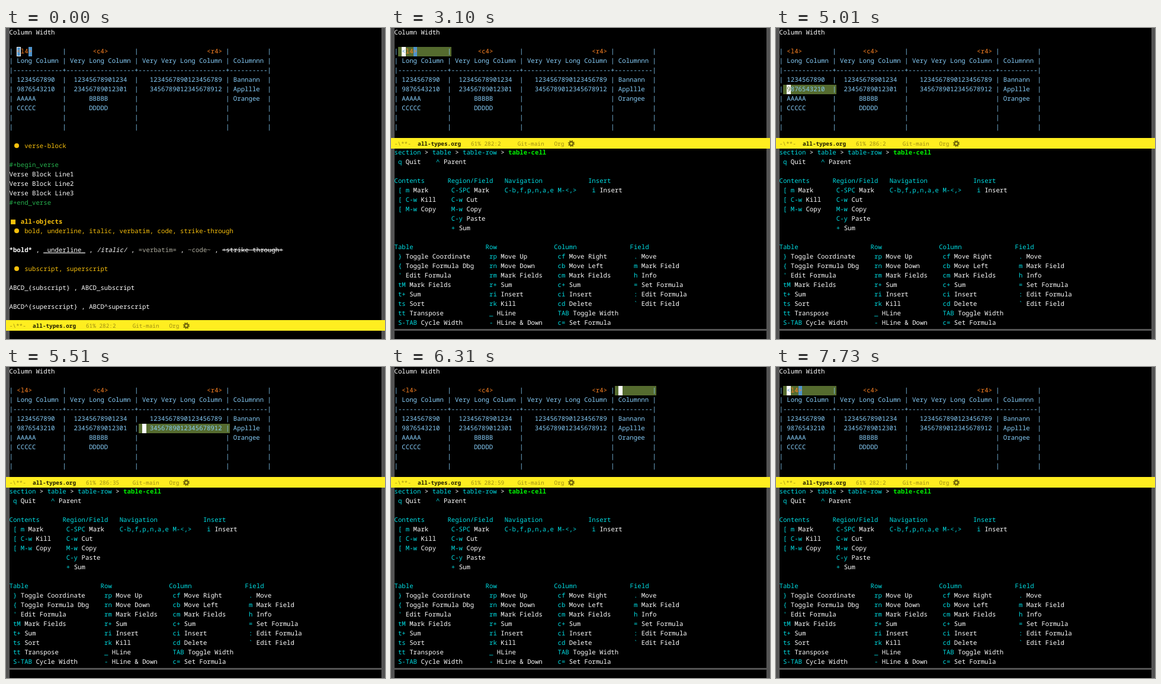
Write an HTML page that moves like this. It is 640x526 px and loops after 8000 ms.

```html
<!DOCTYPE html>
<html lang="en">
<head>
<meta charset="utf-8">
<title>Table editing</title>
<style>
  html, body { margin: 0; width: 100%; height: 100%; overflow: hidden; background: #000; }
  #stage { position: relative; width: 640px; height: 526px; overflow: hidden; background: #000;
    font: 10.7px/16px "Noto Sans Mono", "DejaVu Sans Mono", monospace; color: #fff;
    text-rendering: geometricPrecision; font-variant-ligatures: none; }
  #stage div, #stage span { position: absolute; white-space: pre; }
  .fringe { top: 0; width: 6px; height: 526px; background: #545454; }
  #panel { top: 203px; left: 0; width: 640px; height: 309px; }
  #rule { top: 306px; width: 640px; height: 3px; background: #545454; }
  #bar { left: 0; width: 640px; height: 18px; background: #ffee20; color: #9c8c14;
    font-size: 9.37px; line-height: 19px; }
  #bar .file { color: #1c1a00; font-weight: bold; }
  #bar svg { position: absolute; left: 298px; top: 3px; fill: none; stroke: #6e6208; }
  .table { color: #87cefa; }
  .tag { color: #ff8424; }
  .gold { color: #f8c00c; }
  .green { color: #26b24e; }
  .dim { color: #b0aea0; }
  .cyan { color: #00dce2; }
  .here { color: #00f400; }
  .bold { font-weight: bold; }
  .italic { font-style: italic; }
  .under { text-decoration: underline; }
  .strike { text-decoration: line-through; }
  .mark { width: 8px; height: 8px; background: #f8c00c; }
  .dot { border-radius: 50%; }
  #field { height: 16px; background: #556b2f; }
  .pair, #cursor { width: 6.42px; height: 16px; }
  .pair { background: #4f94cd; }
  #cursor { box-sizing: border-box; background: #fff; }
  #cursor.hollow { background: #4f94cd; border: 1px solid #fff; text-indent: -1px; line-height: 14px; }
</style>
</head>
<body>
<div id="stage">
  <div class="fringe" style="left:0"></div>
  <div class="fringe" style="left:634px"></div>
  <div id="field"></div>
  <div id="top"></div>
  <div id="cursor"></div>
  <div id="text"></div>
  <div id="panel"><div id="rule"></div></div>
  <div id="bar">
    <svg width="13" height="13" viewBox="-6.5 -6.5 13 13">
      <circle r="3.1" stroke-width="2.2"/>
      <circle r="4.8" stroke-width="1.6" stroke-dasharray="1.885"/>
    </svg>
  </div>
</div>
<script>
const LOOP = 8000, LEFT = 5.5, CHAR = 6.42, LINE = 16;
const $ = id => document.getElementById(id);
const head = $('top'), text = $('text'), panel = $('panel'), bar = $('bar'),
      field = $('field'), cursor = $('cursor');
const colX = col => LEFT + col * CHAR;

function add(parent, tag, x, y, cls, str = '') {
  const el = document.createElement(tag);
  el.className = cls;
  el.style.left = x + 'px';
  el.style.top = y + 'px';
  el.textContent = str;
  return parent.appendChild(el);
}
const put = (parent, col, row, str, cls = '') =>
  add(parent, 'span', colX(col), row * LINE, cls, str);

// Table
const table = [
  '|             |                  |                       |          |',
  '| Long Column | Very Long Column | Very Very Long Column | Columnnn |',
  '|-------------+------------------+-----------------------+----------|',
  '| 1234567890  |  12345678901234  |   1234567890123456789 | Bannann  |',
  '| 9876543210  |  23456789012301  |   3456789012345678912 | Appllle  |',
  '| AAAAA       |      BBBBB       |                       | Orangee  |',
  '| CCCCC       |      DDDDD       |                       |          |',
  '|             |                  |                       |          |',
  '|             |                  |                       |          |'
];
const bars = [0, 14, 33, 57, 68];
const pair = add(head, 'div', colX(5), 2 * LINE, 'pair');
put(head, 0, 0, 'Column Width');
table.forEach((line, i) => put(head, 0, i + 2, line, 'table'));
[[2, '<l4>'], [22, '<c4>'], [52, '<r4>']].forEach(([c, s]) => put(head, c, 2, s, 'tag'));

// Document below the table
function heading(row, str) {
  add(text, 'div', 14, row * LINE + 3, 'mark dot');
  put(text, 4, row, str, 'gold');
}
heading(12, 'verse-block');
put(text, 0, 14, '#+begin_verse', 'green');
[1, 2, 3].forEach(n => put(text, 0, 14 + n, 'Verse Block Line' + n));
put(text, 0, 18, '#+end_verse', 'green');
add(text, 'div', 8, 324, 'mark');
put(text, 3, 20, 'all-objects', 'gold bold');
heading(21, 'bold, underline, italic, verbatim, code, strike-through');
let col = 0;
[['*bold*', 'bold'], ['_underline_', 'under'], ['/italic/', 'italic'],
 ['=verbatim=', 'dim'], ['~code~', 'dim'], ['+strike through+', 'strike']].forEach(([s, cls], i) => {
  if (i) put(text, col - 2, 23, ',');
  put(text, col, 23, s, cls);
  col += s.length + 3;
});
heading(25, 'subscript, superscript');
put(text, 0, 27, 'ABCD_{subscript} , ABCD_subscript');
put(text, 0, 29, 'ABCD^{superscript} , ABCD^superscript');

// Key menu
function command(col, row, item) {
  const [key, label = ''] = item.split('|');
  put(panel, col, row, key, 'cyan');
  put(panel, col + key.length + 1, row, label);
}
function group(col, row, title, items) {
  put(panel, col, row, title, 'cyan');
  items.forEach((item, i) => command(col + 1, row + 1 + i, item));
}
put(panel, 0, 0, 'section', 'cyan');
put(panel, 10, 0, 'table', 'cyan');
put(panel, 18, 0, 'table-row', 'cyan');
put(panel, 30, 0, 'table-cell', 'here bold');
[8, 16, 28].forEach(c => put(panel, c, 0, '>'));
command(1, 1, 'q|Quit');
command(11, 1, '^|Parent');
group(0, 3, 'Contents', ['[ m|Mark', '[ C-w|Kill', '[ M-w|Copy']);
group(14, 3, 'Region/Field', ['C-SPC|Mark', 'C-w|Cut', 'M-w|Copy', 'C-y|Paste', '+|Sum']);
group(29, 3, 'Navigation', []);
command(29, 4, 'C-b,f,p,n,a,e M-<,>');
group(51, 3, 'Insert', ['i|Insert']);
group(0, 10, 'Table', ['}|Toggle Coordinate', '{|Toggle Formula Dbg', "'|Edit Formula",
  'tM|Mark Fields', 't+|Sum', 'ts|Sort', 'tt|Transpose', 'S-TAB|Cycle Width']);
group(24, 10, 'Row', ['rp|Move Up', 'rn|Move Down', 'rm|Mark Fields', 'r+|Sum',
  'ri|Insert', 'rk|Kill', '_|HLine', '-|HLine & Down']);
group(42, 10, 'Column', ['cf|Move Right', 'cb|Move Left', 'cm|Mark Fields', 'c+|Sum',
  'ci|Insert', 'cd|Delete', 'TAB|Toggle Width', 'c=|Set Formula']);
group(62, 10, 'Field', ['.|Move', 'm|Mark Field', 'h|Info', '=|Set Formula',
  ':|Edit Formula', '`|Edit Field']);

// Mode line
const status = (col, str, cls = '') => add(bar, 'span', 5.7 + col * 5.62, 0, cls, str);
status(0, '-\\**-');
status(7, 'all-types.org', 'file');
status(23, '61%');
const place = status(27, '');
status(37, 'Git-main');
status(48, 'Org');

// Cursor moves: time, line, table column
const moves = [
  [0, 2, 0], [4790, 3, 0], [4890, 5, 0], [5010, 6, 0], [5310, 6, 1], [5510, 6, 2],
  [5710, 6, 3], [5910, 5, 3], [6210, 3, 3], [6310, 2, 3], [6610, 2, 2], [6830, 2, 1],
  [6930, 2, 0], [7130, 10, 3], [7630, 2, 0]
];
const show = (el, on) => el.style.display = on ? '' : 'none';

function draw(now) {
  const t = now % LOOP, menu = t >= 3100, hollow = t < 1290;
  const [, row, cell] = moves.filter(m => m[0] <= t).pop();
  const c = bars[cell] + 2, onTag = row === 2 && cell === 0;

  show(text, !menu);
  show(panel, menu);
  show(field, menu);
  show(pair, onTag);
  bar.style.top = (menu ? 186 : 494) + 'px';
  place.textContent = `${280 + row}:${c}`;

  field.style.left = colX(bars[cell] + 1) + 'px';
  field.style.width = (bars[cell + 1] - bars[cell]) * CHAR + 'px';
  field.style.top = cursor.style.top = row * LINE + 'px';
  cursor.style.left = colX(c) + 'px';
  cursor.className = hollow ? 'hollow' : '';
  cursor.style.color = hollow ? '#ff8424' : onTag ? '#4f94cd' : '#556b2f';
  cursor.textContent = onTag ? '<' : table[row - 2][c];
  requestAnimationFrame(draw);
}
draw(performance.now());
</script>
</body>
</html>
```
